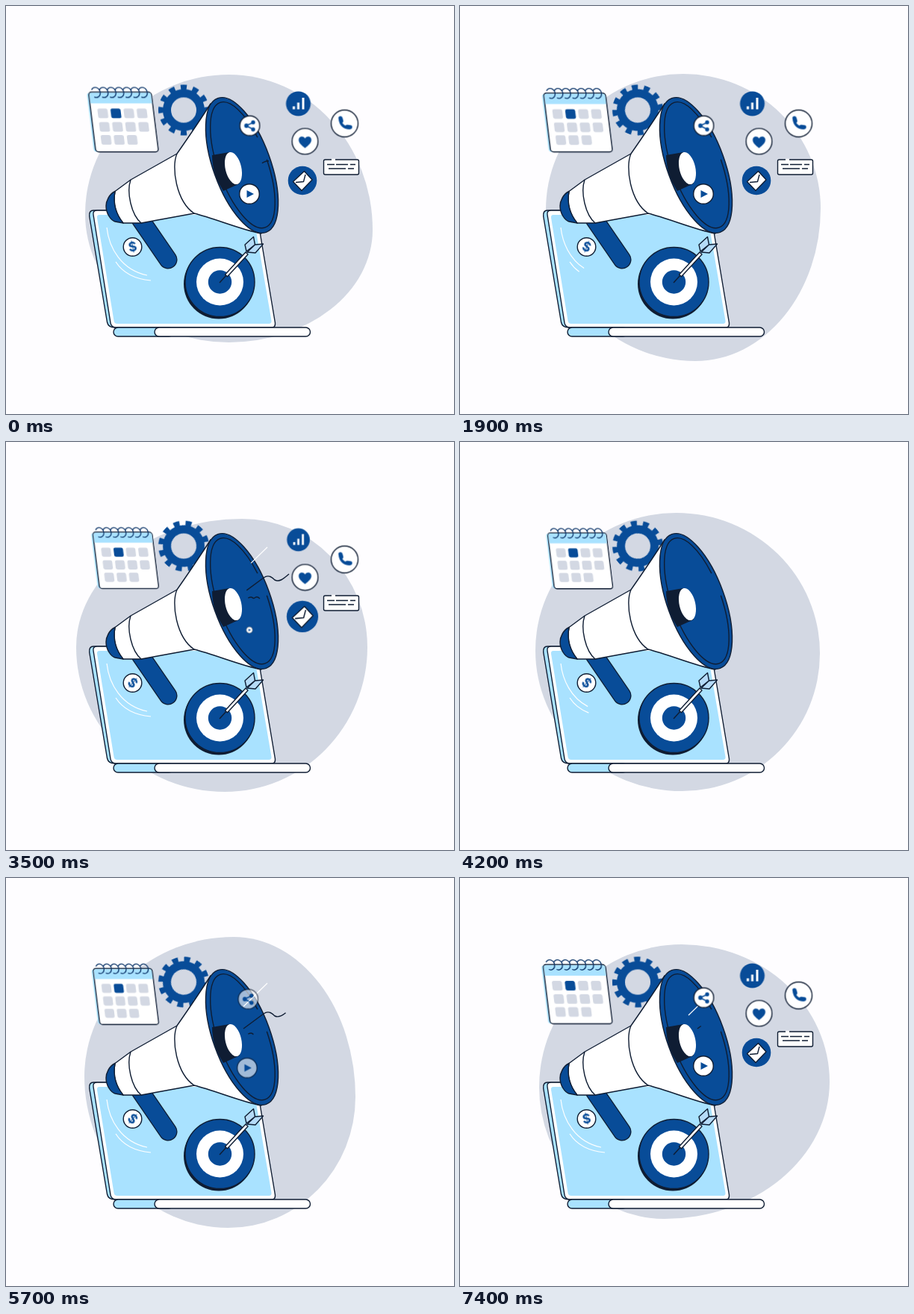
Recreate the animation shown at these times as an HTML page without scripts. Size 600 by 547 pixels, loop 7.5 s.

```html
<!DOCTYPE html>
<html lang="en">
<head>
<meta charset="utf-8">
<title>Marketing megaphone</title>
<style>
:root { --ink: #0f1d33; --blue: #084c98; --sky: #a9e2ff; --grey: #d3d8e3; --loop: 7.5s linear infinite; }
html, body { margin: 0; width: 100%; height: 100%; overflow: hidden; background: #fefdff; }
svg { position: absolute; left: 0; top: 0; width: 600px; height: 547px; }
.blob { position: absolute; background: var(--grey); animation: blob var(--loop); }

.line { fill: none; stroke: var(--ink); stroke-width: 1.4; stroke-linejoin: round; }
.white { fill: #fff; stroke: var(--ink); stroke-width: 1.4; stroke-linejoin: round; }
.sky { fill: var(--sky); stroke: var(--ink); stroke-width: 1.4; stroke-linejoin: round; }
.blue { fill: var(--blue); }
.edge { stroke: var(--ink); stroke-width: 1.4; stroke-linejoin: round; }
.glow { fill: none; stroke: #fff; stroke-width: 1.2; }

.gear { animation: gear var(--loop); }
.calendar { transform-origin: 203px 195px; animation: calendar var(--loop); }
.horn { transform-origin: 140px 280px; animation: horn var(--loop); }
.coin { animation: coin var(--loop); font: bold 17px Inter, Roboto, sans-serif; text-anchor: middle; fill: var(--blue); }
.arc1 { animation: arc1 var(--loop); }
.arc2 { animation: arc2 var(--loop); }
.ray { animation: ray var(--loop); }
.wave { animation: wave var(--loop); }
.curl { animation: curl var(--loop); }
.pop { animation: pop var(--loop), fade var(--loop); animation-delay: var(--d, 0s), var(--e, var(--d, 0s)); }

@keyframes blob {
  0%, 100% { left: 106px; top: 92px; width: 385px; height: 359px; border-radius: 50% 50% 50% 50% / 52% 58% 42% 48%; }
  14.67% { left: 112px; top: 91px; width: 372px; height: 385px; border-radius: 48% 52% 44% 56% / 44% 46% 54% 56%; }
  22% { left: 114px; top: 91px; width: 370px; height: 389px; border-radius: 50% 50% 44% 56% / 46% 46% 54% 54%; }
  34.67% { left: 119px; top: 92px; width: 362px; height: 373px; border-radius: 50% 50% 50% 50% / 51% 49% 51% 49%; }
  46.67% { left: 94px; top: 103px; width: 390px; height: 366px; border-radius: 57% 43% 49% 51% / 47% 47% 53% 53%; }
  65.33% { left: 107px; top: 87px; width: 373px; height: 380px; border-radius: 42% 58% 48% 52% / 52% 54% 46% 48%; }
  76% { left: 105px; top: 79px; width: 363px; height: 390px; border-radius: 55% 45% 47% 53% / 48% 55% 45% 52%; }
  86% { left: 106px; top: 89px; width: 368px; height: 379px; border-radius: 54% 46% 50% 50% / 49% 52% 48% 51%; }
  98.67% { left: 106px; top: 89px; width: 389px; height: 368px; border-radius: 49% 51% 57% 43% / 52% 50% 50% 48%; }
}
@keyframes gear { to { transform: rotate(90deg); } }
@keyframes calendar {
  0%, 14.67%, 100% { transform: none; }
  34.67% { transform: translate(.2px, .3px) scale(.975); }
  46.67% { transform: translate(.5px, 1px) scale(.945); }
  65.33% { transform: translate(1px, 1.5px) scale(.925); }
  76% { transform: translate(.5px, 1px) scale(.94); }
  98.67% { transform: scale(.993); }
}
@keyframes horn {
  0%, 56%, 75%, 100% { transform: none; }
  65.33%, 68% { transform: scaleX(.982); }
}
@keyframes coin {
  0%, 14.67%, 98%, 100% { transform: rotate(-12deg); }
  32%, 80% { transform: rotate(42deg); }
}
@keyframes arc1 {
  0%, 3%, 32%, 52%, 75%, 100% { stroke-dasharray: 0 0 100 200; }
  14.67% { stroke-dasharray: 0 0 72 200; }
  20% { stroke-dasharray: 0 0 50 200; }
  65.33% { stroke-dasharray: 0 0 30 200; }
}
@keyframes arc2 {
  0%, 3%, 32%, 52%, 76%, 100% { stroke-dasharray: 0 0 100 200; }
  14.67% { stroke-dasharray: 0 0 12 200; }
  18%, 22%, 62%, 68% { stroke-dasharray: 0 0 0 200; }
}
@keyframes ray {
  0%, 42%, 72%, 97.33% { stroke-dasharray: 0 0 0 200; }
  44.67%, 74.67% { stroke-dasharray: 0 0 100 200; }
  46.67% { stroke-dasharray: 0 50 50 200; }
  48.67%, 78.67% { stroke-dasharray: 0 100 0 200; }
  76% { stroke-dasharray: 0 27 73 200; }
  98.67% { stroke-dasharray: 0 0 32 200; }
  100% { stroke-dasharray: 0 0 60 200; }
}
@keyframes wave {
  0%, 42%, 72.67%, 98% { stroke-dasharray: 0 0 0 200; }
  45.33%, 76.67% { stroke-dasharray: 0 0 100 200; }
  46.67% { stroke-dasharray: 0 7 93 200; }
  50%, 80.67% { stroke-dasharray: 0 100 0 200; }
  76% { stroke-dasharray: 0 0 92 200; }
  98.67% { stroke-dasharray: 0 0 8 200; }
  100% { stroke-dasharray: 0 0 20 200; }
}
@keyframes curl {
  0%, 100% { stroke-dasharray: 0 75 25 200; }
  1.33%, 49.33%, 79.33% { stroke-dasharray: 0 100 0 200; }
  44%, 74%, 98.67% { stroke-dasharray: 0 0 0 200; }
  46.67% { stroke-dasharray: 0 22 45 200; }
  76% { stroke-dasharray: 0 22 20 200; }
}
@keyframes pop {
  0%, 42.67% { transform: none; }
  44% { transform: scale(1.1); }
  46.67%, 70.66% { transform: scale(0); }
  70.67%, 72.67% { transform: translate(-6px, 5px); }
  78%, 100% { transform: none; }
}
@keyframes fade {
  0%, 46.67% { opacity: 1; }
  47%, 72.67% { opacity: 0; }
  78%, 100% { opacity: 1; }
}
</style>
</head>
<body>
<div class="blob"></div>
<svg viewBox="0 0 600 547">
  <defs>
    <rect id="day" width="13.5" height="13" rx="2.5"/>
    <path id="ring" d="M-6.500 -3A6 6.800 0 1 1 -4 6.500" fill="none" stroke="#0b3468" stroke-width="1.400"/>
  </defs>

  <g transform="translate(238 139.500)">
    <g class="gear" fill="none" stroke="#084c98">
      <circle r="22.500" stroke-width="11"/>
      <circle r="30" stroke-width="8" pathLength="24" stroke-dasharray="1 1" stroke-dashoffset=".5"/>
    </g>
  </g>

  <g class="calendar">
    <g transform="translate(110.500 115.500) skewX(7)">
      <rect x="-2.500" y="1" width="84" height="79" rx="4" fill="#a9e2ff"/>
      <rect width="84" height="80" rx="4" class="white"/>
      <path d="M.7 15V4Q.7 .7 4 .7H80Q83.300 .7 83.300 4V15Z" fill="#a9e2ff"/>
      <g fill="#d3d8e3">
        <use href="#day" x="9" y="22"/><use href="#day" x="26.500" y="22" class="blue"/>
        <use href="#day" x="44" y="22"/><use href="#day" x="61.500" y="22"/>
        <use href="#day" x="9" y="40"/><use href="#day" x="26.500" y="40"/>
        <use href="#day" x="44" y="40"/><use href="#day" x="61.500" y="40"/>
        <use href="#day" x="9" y="57.500"/><use href="#day" x="26.500" y="57.500"/><use href="#day" x="44" y="57.500"/>
      </g>
      <use href="#ring" x="11"/><use href="#ring" x="21.500"/><use href="#ring" x="32"/><use href="#ring" x="42.500"/>
      <use href="#ring" x="53"/><use href="#ring" x="63.500"/><use href="#ring" x="74"/>
    </g>
  </g>

  <!-- laptop -->
  <path class="sky" d="M117 274H330L356 431H146Q137 431 135.500 424L111.700 282Q111 274 117 274Z"/>
  <path class="white" d="M122 274H330Q335 274 336 279L360.500 425Q361 431 356 431H148Q141 431 140 425L117 280Q116 274 122 274Z"/>
  <path fill="#a9e2ff" d="M125 280H327Q331 280 332 284L355.500 422Q356 426 352 426H149Q145 426 144.500 422L122 284Q121.500 280 125 280Z"/>
  <rect class="sky" x="144" y="431" width="80" height="12" rx="6"/>
  <rect class="white" x="199" y="431" width="208.500" height="12" rx="6"/>
  <path class="glow arc1" pathLength="100" d="M135 297C138 325 155 354 189 361"/>
  <path class="glow arc2" pathLength="100" d="M147 343C156 357 172 366 194 368"/>
  <circle class="white" cx="169.500" cy="323" r="12.300"/>
  <g transform="translate(169.500 323)"><text class="coin" y="6">$</text></g>

  <!-- target -->
  <circle cx="285" cy="372.500" r="47" fill="#0f1d33"/>
  <circle class="blue edge" cx="286.500" cy="370" r="46.500"/>
  <circle cx="286.500" cy="370" r="31.500" fill="#fff"/>
  <circle class="blue" cx="286.500" cy="370" r="15.700"/>
  <path class="line" d="M286 371L296 360"/>
  <path class="white" d="M293.500 360L321 330L324 333L296.500 362.800Z"/>
  <g class="edge" fill="#b5dbf8">
    <path d="M322 329L320 320L331.500 309.500L333.500 320Z"/>
    <path d="M323 330L334 331L344.500 319L333.500 320Z"/>
  </g>

  <!-- megaphone -->
  <path d="M180 286L217 340" stroke="#0f1d33" stroke-width="25" stroke-linecap="round"/>
  <path d="M180 286L217 340" stroke="#084c98" stroke-width="22.500" stroke-linecap="round"/>
  <g class="horn">
    <path class="white" d="M146 248.500L167 233L229 198C245 175 260 153 274 131L342 305C315 300 280 285 252 278L181 291L157 291C148 280 143 265 146 248.500Z"/>
    <path class="blue edge" d="M146 248.500C138 252 134 262 134 268C134 278 140 287 146 289L157 291C148 280 143 265 146 248.500Z"/>
    <path class="line" d="M167 233C161 250 168 280 181 291M229 198C221 216 228 262 252 278"/>
    <g transform="translate(316 213.500) rotate(-19.800)">
      <ellipse class="blue edge" rx="38.500" ry="95.500"/>
      <ellipse class="line" cx="1" rx="33" ry="89" pathLength="100" stroke-dasharray="92 8" stroke-dashoffset="-1"/>
    </g>
    <path fill="#0f1d33" d="M276 200L299 196L313 238L291 248C281 233 276 216 276 200Z"/>
    <ellipse cx="304.500" cy="217.500" rx="10.700" ry="22" transform="rotate(-13 304.500 217.500)" fill="#fff"/>
  </g>

  <path class="glow ray" pathLength="100" d="M306 184L350 141"/>
  <path class="line wave" pathLength="100" d="M318 202L345 182C352 177 357 182 360 185C366 188 371 184 379 177"/>
  <path class="line curl" pathLength="100" d="M316 212C322 211 325 208 328 208S331 211 333 209S337 207 340 210S347 206 352 208"/>

  <!-- icons -->
  <g transform="translate(326.500 160.500)"><g class="pop">
    <circle class="white" r="13.300"/>
    <path d="M5 -4.500L-5 0L5 5" fill="none" stroke="#084c98" stroke-width="1.600"/>
    <g class="blue"><circle cx="-4.500" r="2.900"/><circle cx="4.500" cy="-4.500" r="2.700"/><circle cx="4.500" cy="5" r="2.700"/></g>
  </g></g>
  <g transform="translate(326 252)"><g class="pop" style="--d:.06s;--e:0s">
    <circle class="white" r="13.300"/>
    <path class="blue" d="M-3.500 -5L6 0L-3.500 5Z"/>
  </g></g>
  <g transform="translate(391.500 131)"><g class="pop" style="--d:.17s;--e:.3s">
    <circle class="blue" r="16.500"/>
    <path d="M-6 7.500V3.500M0 7.500V-1.500M6.500 7.500V-8" stroke="#fff" stroke-width="3"/>
  </g></g>
  <g transform="translate(400.500 181.500)"><g class="pop" style="--d:.3s">
    <circle class="white" r="17.400"/>
    <path class="blue" d="M0 9C-5 5 -8.500 2 -8.500 -2C-8.500 -7 -2.500 -8 0 -4C2.500 -8 8.500 -7 8.500 -2C8.500 2 5 5 0 9Z"/>
  </g></g>
  <g transform="translate(397 234)"><g class="pop" style="--d:.2s;--e:.35s">
    <circle class="blue" r="19.300"/>
    <path class="white" d="M-12.500 1.500L2.500 -12.500L13 -1L-1 13.500Z"/>
    <path class="line" d="M-9 2.500L1.500 1.500L4 -8"/>
  </g></g>
  <g transform="translate(449 216)"><g class="pop" style="--d:.5s">
    <rect class="white" x="-23.500" y="-10" width="47" height="20" rx="2"/>
    <path d="M-13 -10H-8" stroke="#fff" stroke-width="2.500"/>
    <path class="line" d="M-19 -3.500H-9M-7 -3.500H9M12 -3.500H19M-17 2H6M9 2H17"/>
  </g></g>
  <g transform="translate(453.500 157.500)"><g class="pop" style="--d:.5s">
    <circle class="white" r="18"/>
    <path d="M-6 -6C-6 1 -1 6 7 6" fill="none" stroke="#084c98" stroke-width="3.500"/>
    <path d="M-5.500 -7L-4.500 -3.500M3.500 4.500L7.500 5" fill="none" stroke="#084c98" stroke-width="5.500" stroke-linecap="round"/>
  </g></g>
</svg>
</body>
</html>
```
